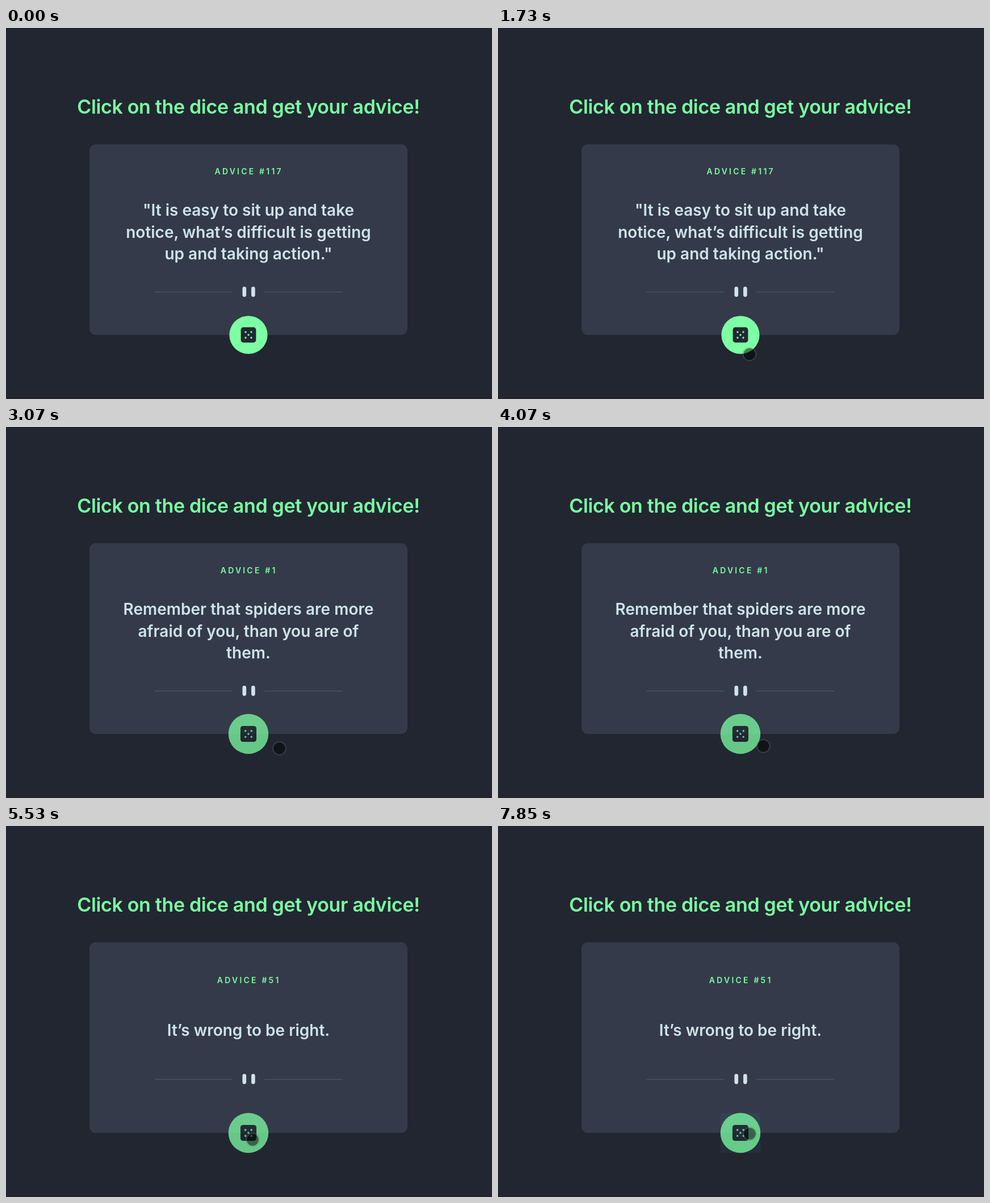
Recreate the animation shown at these times as an HTML page. Size 856 by 654 pixels, loop 7990 ms.

```html
<!DOCTYPE html>
<html lang="en">
<head>
<meta charset="utf-8">
<title>Advice generator</title>
<style>
  html, body { margin: 0; width: 100%; height: 100%; overflow: hidden; background: #222631; }
  svg { display: block; width: 856px; height: 654px; }
  text { font-family: Inter, "Open Sans", sans-serif; font-weight: 600; font-optical-sizing: none; text-anchor: middle; }
  .title { font-size: 34px; letter-spacing: -.34px; fill: #7affa2; }
  .label { font-size: 14px; letter-spacing: 3.2px; fill: #7affa2; }
  .quote { font-size: 28px; fill: #cee3e9; }
</style>
</head>
<body>
<svg viewBox="0 0 856 654">
  <rect width="856" height="654" fill="#222631"/>
  <rect width="856" height="1" fill="#1b1e28"/>
  <rect y="650" width="856" height="4" fill="#24232e"/>
  <text class="title" x="427" y="151">Click on the dice and get your advice!</text>
  <rect x="147" y="205" width="560" height="336" rx="11" fill="#343a49"/>
  <text class="label" id="label" x="427.7"/>
  <g id="quote"></g>
  <g id="divider">
    <path d="M262 .5H398.5M455.5 .5H592" stroke="#4f5d74" stroke-width="1.12"/>
    <path d="M419.8 -5.6V5.6M435.4 -5.6V5.6" stroke="#cee3e9" stroke-width="6.7" stroke-linecap="round"/>
  </g>
  <g id="button">
    <rect id="highlight" x="-33.6" y="-33.6" width="67.2" height="67.2" fill="#33b5e5"/>
    <g id="dice">
      <circle r="33.6" fill="#7dffa3"/>
      <rect x="-13.4" y="-13.4" width="26.8" height="26.8" rx="4.4" fill="#202733"/>
      <path d="M-5 -5h0M5 -5h0M0 0h0M-5 5h0M5 5h0" stroke="#7dffa3" stroke-width="3.4" stroke-linecap="round"/>
    </g>
  </g>
  <g id="cursor">
    <circle id="ring"/>
    <circle id="disc"/>
  </g>
</svg>
<script>
const LOOP = 7990;
const ENTER = 650, PRESS_MS = 70, TAP_GLOW_MS = 250, HOVER_MS = 360;
const taps = [2130, 4810, 7650];

const messages = [
  { at: 0, id: 117, lines: ['"It is easy to sit up and take', 'notice, what’s difficult is getting', 'up and taking action."'] },
  { at: 2730, id: 1, lines: ['Remember that spiders are more', 'afraid of you, than you are of', 'them.'] },
  { at: 5200, id: 51, lines: ['It’s wrong to be right.'] },
];

// The pointer glides in from the lower right, then on and off the dice.
const entry = { x: 721, y: 638 };
const glides = [
  { at: ENTER, ms: 740, x: 520, y: 602 },
  { at: 1400, ms: 330, x: 443, y: 575 },
  { at: 1730, ms: 200, x: 438, y: 566 },
  { at: 2700, ms: 370, x: 481.5, y: 566.5 },
  { at: 3950, ms: 460, x: 428, y: 551 },
  { at: 5450, ms: 700, x: 483.5, y: 568.5 },
  { at: 6560, ms: 690, x: 443.5, y: 542.5 },
];

const $ = id => document.getElementById(id);
const set = (id, attrs) => Object.entries(attrs).forEach(([k, v]) => $(id).setAttribute(k, v));
const progress = (t, at, ms) => Math.min(1, Math.max(0, (t - at) / ms));
const smooth = v => v * v * (3 - 2 * v);
const tappedWithin = (t, delay, ms) => taps.some(at => t >= at + delay && t < at + delay + ms);

const pointerAt = t => glides.reduce((p, g) => {
  const k = progress(t, g.at, g.ms);
  return { x: p.x + (g.x - p.x) * k, y: p.y + (g.y - p.y) * k };
}, entry);

let shown;
function showMessage(message) {
  if (message === shown) return;
  shown = message;
  const short = message.lines.length === 1;
  $('label').textContent = 'ADVICE #' + message.id;
  set('label', { y: short ? 277 : 258 });
  $('quote').innerHTML = message.lines.map((line, i) =>
    `<text class="quote" x="427" y="${(short ? 369.5 : 331.3) + i * 38.2}">${line}</text>`).join('');
  set('divider', { transform: `translate(0 ${short ? 446 : 465})` });
}

// The first tap leaves the button in its hover state.
function drawButton(t) {
  const k = smooth(progress(t, taps[0] + PRESS_MS / 2, HOVER_MS));
  set('button', { transform: `translate(427 541) rotate(${90 * k}) scale(${1 + .05 * k})` });
  set('dice', { opacity: 1 - .25 * k });
  set('highlight', { opacity: tappedWithin(t, PRESS_MS, TAP_GLOW_MS) ? .06 : 0 });
}

function drawCursor(t) {
  const pressed = tappedWithin(t, 0, PRESS_MS);
  const { x, y } = pointerAt(t);
  set('cursor', { transform: `translate(${x} ${y})`, visibility: t < ENTER ? 'hidden' : 'visible' });
  set('ring', pressed
    ? { r: 13.5, fill: 'rgba(200,185,0,.52)', stroke: 'none' }
    : { r: 11.4, fill: 'none', stroke: 'rgba(110,110,110,.3)', 'stroke-width': 2.2 });
  set('disc', { r: 10.4, fill: pressed ? 'rgba(150,130,0,.3)' : 'rgba(0,0,0,.5)' });
}

function render(t) {
  showMessage(messages.filter(m => m.at <= t).pop());
  drawButton(t);
  drawCursor(t);
}

const start = performance.now();
function tick(now) {
  render(Math.max(0, now - start) % LOOP);
  requestAnimationFrame(tick);
}
render(0);
requestAnimationFrame(tick);
</script>
</body>
</html>
```
